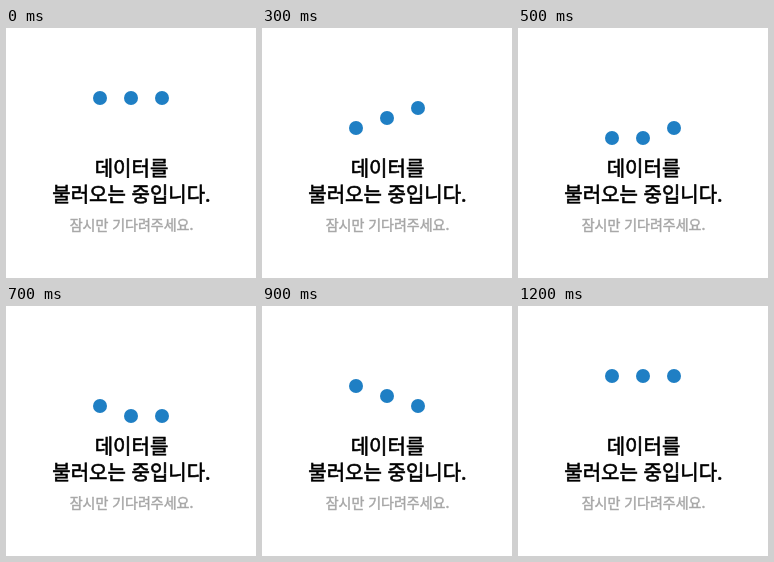
Animation, 250 px wide and 250 px high, one loop 1300 ms. Source, as an HTML page:

```html
<!DOCTYPE html>
<html lang="ko">
<head>
<meta charset="utf-8">
<title>로딩</title>
<style>
  html, body { margin: 0; width: 100%; height: 100%; overflow: hidden; background: #fff; }
  svg { display: block; width: 250px; height: 250px; }
  /* The thin stroke gives a medium weight. */
  text {
    font: 400 20px "Noto Sans CJK KR", "Noto Sans KR", "Noto Sans CJK", sans-serif;
    text-anchor: middle; fill: #000; stroke: #000; stroke-width: .6px;
  }
  .note { font-size: 14px; fill: #a6a6a6; stroke: #a6a6a6; stroke-width: .45px; }
  circle { fill: #1f7fc4; }
</style>
</head>
<body>
<svg viewBox="0 0 250 250">
  <circle cx="94" cy="70" r="7"/>
  <circle cx="125" cy="70" r="7"/>
  <circle cx="156" cy="70" r="7"/>
  <text x="125.5" y="148">데이터를</text>
  <text x="125.5" y="174">불러오는 중입니다.</text>
  <text class="note" x="125.5" y="201.5">잠시만 기다려주세요.</text>
</svg>
<script>
  const STEP = 100, STEPS = 13, TOP = 70, RISE = 10, TRAVEL = 4, TURN = 6;
  const dots = document.querySelectorAll("circle");
  const start = performance.now();
  const travel = n => Math.max(0, Math.min(TRAVEL, n));

  // Each dot drops, rests and climbs back one step after its left neighbour.
  function draw(now) {
    const step = Math.floor(Math.max(0, now - start) / STEP) % STEPS;
    dots.forEach((dot, i) => {
      const depth = travel(step - i) - travel(step - TURN - i);
      dot.setAttribute("cy", TOP + RISE * depth);
    });
    requestAnimationFrame(draw);
  }
  draw(start);
</script>
</body>
</html>
```
